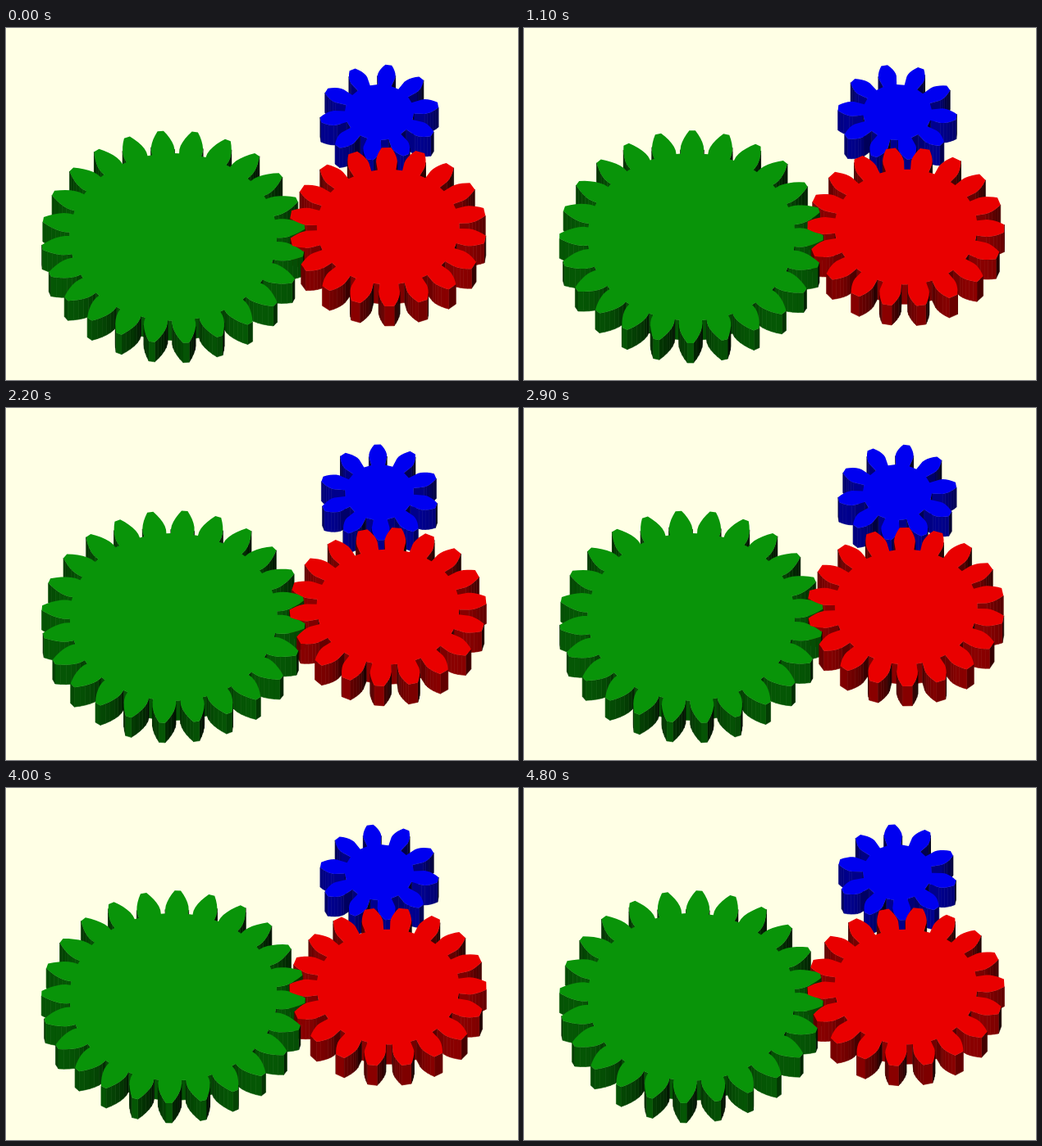
An HTML page with a canvas for the animation above (4.9 s loop, 624 by 430 pixels).

```html
<!DOCTYPE html>
<html lang="en">
<head>
<meta charset="utf-8">
<title>Three gears</title>
<style>
html, body { margin: 0; width: 100%; height: 100%; overflow: hidden; background: #ffffe5; }
canvas { display: block; width: 624px; height: 430px; }
</style>
</head>
<body>
<canvas id="stage" width="624" height="430"></canvas>
<script>
const ctx = document.getElementById('stage').getContext('2d');
const RAD = Math.PI / 180;
const TILT = 0.808;     // vertical squash of the top faces
const DEPTH = 24;       // wall height on screen
const PITCH = 6.25;     // pitch radius per tooth
const PRESSURE = 28 * RAD;
const FACETS = 5;
const STEP = 100, COUNT = 49;

// phase: angle of one tooth at the start, clockwise from the top, in degrees
const gears = [
  { x: 455, y: 103, teeth: 10, tip: 72.5, root: 42, phase: 9, dir: -1, rgb: [0, 0, 240] },
  { x: 204, y: 255.2, teeth: 24, tip: 160.8, root: 126.5, phase: -5.6, dir: -1, rgb: [9, 148, 9] },
  { x: 465.5, y: 243, teeth: 18, tip: 120, root: 87, phase: -0.9, dir: 1, rgb: [233, 0, 0] }
];

// [tick, tenths of a tooth turned]
const turns = [[0, 0], [6, 14], [16, 37], [22, 53], [29, 70], [40, 95], [48, 114]];

const inv = a => Math.tan(a) - a;

// One flank as [radius, half angle] from root to tip
function flank(g) {
  const pitch = g.teeth * PITCH;
  const base = pitch * Math.cos(PRESSURE);
  const mid = Math.PI / (2 * g.teeth) + inv(PRESSURE);
  const pts = [[g.root, mid]];
  for (let i = 0; i <= FACETS; i++) {
    const r = base + (g.tip - base) * i / FACETS;
    pts.push([r, mid - inv(Math.acos(Math.min(1, base / r)))]);
  }
  return pts;
}
gears.forEach(g => { g.flank = flank(g); });

function turned(tick) {
  let i = 1;
  while (turns[i][0] < tick) i++;
  const [t0, v0] = turns[i - 1], [t1, v1] = turns[i];
  return Math.round(v0 + (v1 - v0) * (tick - t0) / (t1 - t0)) / 10;
}

function outline(g, teethTurned) {
  const pitchAngle = 2 * Math.PI / g.teeth;
  const start = g.phase * RAD + g.dir * teethTurned * pitchAngle;
  const pts = [];
  const add = (r, a) => pts.push([r * Math.sin(a), -r * Math.cos(a)]);
  for (let n = 0; n < g.teeth; n++) {
    const a = start + n * pitchAngle;
    for (const [r, h] of g.flank) add(r, a - h);
    for (const [r, h] of [...g.flank].reverse()) add(r, a + h);
  }
  return pts;
}

const tint = (rgb, s) => `rgb(${rgb.map(v => Math.round(v * s)).join(',')})`;

function trace(pts) {
  ctx.beginPath();
  pts.forEach(p => ctx.lineTo(p[0], p[1]));
  ctx.closePath();
}

function walls(g, pts) {
  const list = [];
  pts.forEach((p, i) => {
    const q = pts[(i + 1) % pts.length];
    const dx = q[0] - p[0], dy = q[1] - p[1];
    if (dx >= 0) return;   // faces away
    const len = Math.hypot(dx, dy);
    const light = Math.max(0, (-0.95 * dx - 0.25 * dy) / len);
    const x0 = g.x + p[0], y0 = g.y + p[1] * TILT;
    const x1 = g.x + q[0], y1 = g.y + q[1] * TILT;
    list.push({
      y: (y0 + y1) / 2,
      color: tint(g.rgb, 0.1 + 0.5 * light),
      pts: [[x0, y0], [x1, y1], [x1, y1 + DEPTH], [x0, y0 + DEPTH]]
    });
  });
  return list;
}

function draw(tick) {
  const turn = turned(tick);
  ctx.fillStyle = '#ffffe5';
  ctx.fillRect(0, 0, 624, 430);
  ctx.lineWidth = 0.6;
  ctx.lineJoin = 'round';
  const shapes = gears.map(g => outline(g, turn));

  gears.flatMap((g, i) => walls(g, shapes[i]))
    .sort((a, b) => a.y - b.y)
    .forEach(w => {
      ctx.fillStyle = ctx.strokeStyle = w.color;
      trace(w.pts);
      ctx.fill();
      ctx.stroke();
    });

  gears.forEach((g, i) => {
    ctx.fillStyle = tint(g.rgb, 1);
    trace(shapes[i].map(([x, y]) => [g.x + x, g.y + y * TILT]));
    ctx.fill();
  });
}

const begin = performance.now();
function loop() {
  const t = Math.max(0, performance.now() - begin);
  draw(Math.floor(t / STEP) % COUNT);
  requestAnimationFrame(loop);
}
loop();
</script>
</body>
</html>
```
